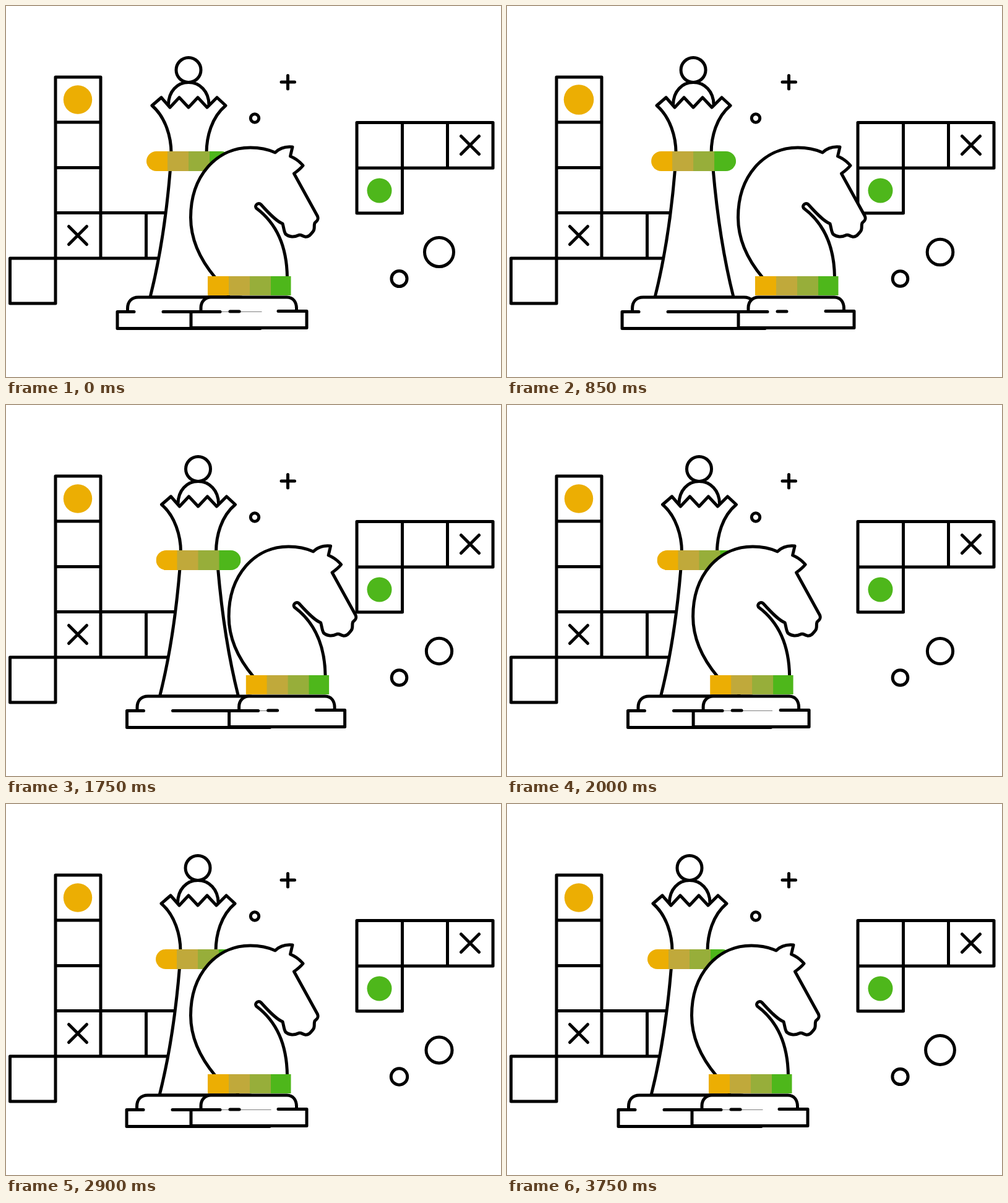
These frames come from a looping animation (800x600 px, 3.8 s). An HTML page:

```html
<!DOCTYPE html>
<html lang="en">
<head>
<meta charset="utf-8">
<title>Chess pieces</title>
<style>
html, body { margin: 0; width: 100%; height: 100%; overflow: hidden; background: #fff; }
svg { display: block; }
.line { fill: none; stroke: #000; stroke-width: 5; stroke-linecap: round; stroke-linejoin: round; }
.solid { fill: #fff; }
</style>
</head>
<body>
<svg width="800" height="600" viewBox="0 0 800 600">
  <defs>
    <g id="band">
      <path fill="#ecae03" d="M0 0h35v32H0z"/>
      <path fill="#c0a93b" d="M34 0h35v32H34z"/>
      <path fill="#97ae3a" d="M68 0h35v32H68z"/>
      <path fill="#4eb71b" d="M102 0h35v32h-35z"/>
    </g>
    <clipPath id="pill"><rect width="137" height="32" rx="16"/></clipPath>
    <clipPath id="strip"><rect width="134.5" height="31"/></clipPath>
    <path id="cross" d="M-14.5-14.5l29 29m0-29l-29 29"/>
  </defs>

  <g class="line">
    <path d="M80 115h73v293H80zM80 188h73M80 261.5h73M80 334.5h220v73.5H153M226.5 334.5V408M80 408H6.500v73H80z"/>
    <path d="M567 188.500h220V262H567zM640.500 188.500V335H567V262M713.500 188.500V262"/>
    <path d="M445 123h21.500M455.500 112.500V134"/>
    <circle cx="402" cy="181.500" r="6.700"/>
    <circle id="big" cx="700" cy="398"/>
    <circle id="small" cx="635.500" cy="441"/>
    <use id="leftCross" href="#cross"/>
    <use id="rightCross" href="#cross"/>
  </g>
  <circle id="orange" r="23.200" fill="#ecae03"/>
  <circle id="green" r="20" fill="#4eb71b"/>

  <g id="queen">
    <g class="line">
      <circle class="solid" cx="295" cy="103.500" r="20"/>
      <path class="solid" d="M262.500 160C262.500 138 277 123.500 295 123.500S328 138 328 160"/>
      <path class="solid" d="M267 238C267 212 258 180 236 161L251 148 265 164 280 148 295 164 310 148 325 164 341 148 355 161C332 180 324 212 324 238"/>
      <path class="solid" d="M265.500 264Q256 380 233 471H360Q337 380 327 264"/>
      <path class="solid" d="M207 494.500H180V521.500H411V494.500H254M196.500 492V489C196.500 478 203 471 214 471H377C388 471 394.500 478 394.500 489V492"/>
    </g>
    <g transform="translate(227 235)"><use href="#band" clip-path="url(#pill)"/></g>
  </g>

  <g id="knight">
    <path class="solid" d="M299 494.500h187v26H299zM315 494V488C315 478 322 471 331 471H454C465 471 469.500 480 469.500 489V494z"/>
    <g class="line">
      <path class="solid" d="M338 439C312 408 298.500 376 298.500 342C298.500 275 340 229 395 229C410 229 424 232 435 237C441 231 449 226.500 463 228L459.500 243C469 247 475 252 480 258C476 263 471 267 465.500 271L503.500 340C506 347 501 348 499 351C497 356 500 361 496 365C492 370 489 374 483 373C477 371 476 369 472 371C466 374 458 374 452 369C449 365 449 358 447 352C439 349 430 341 412 321C408 317 401 322 404.500 327C438 352 454 390 454.500 439"/>
      <path d="M315 492V488C315 478 322 471 331 471H454C465 471 469.500 480 469.500 489V492"/>
      <path d="M440 493.500H486V520.500H299V494.500H346M362 494H377"/>
    </g>
    <g transform="translate(326 437)"><use href="#band" clip-path="url(#strip)"/></g>
  </g>
</svg>
<script>
const LOOP = 3800, MOVE = 500;
const $ = id => document.getElementById(id);
const wave = (t, period, peak) => (1 + Math.cos(2 * Math.PI * (t - peak) / period)) / 2;

// Symmetric ease, cubic-bezier(.6, 0, .4, 1), solved by bisection
function ease(x) {
  if (x <= 0) return 0;
  if (x >= 1) return 1;
  let lo = 0, hi = 1;
  for (let i = 0; i < 20; i++) {
    const s = (lo + hi) / 2, r = 1 - s;
    if (1.8 * s * r * r + 1.2 * s * s * r + s ** 3 < x) lo = s; else hi = s;
  }
  return lo * lo * (3 - 2 * lo);
}

const thereAndBack = (t, out, back) => ease((t - out) / MOVE) - ease((t - back) / MOVE);

const pulse = (t, peaks) => Math.max(...peaks.map(p =>
  Math.abs(t - p) < 150 ? Math.cos((t - p) / 300 * Math.PI) ** 2 : 0));

const marks = [
  { id: 'green', x: 603.5, y: 298.5, grow: 0.12, peaks: [230, 2550] },
  { id: 'rightCross', x: 750, y: 225, grow: 0.36, peaks: [470, 2150] },
  { id: 'orange', x: 116, y: 151.5, grow: 0.1, peaks: [930, 3070] },
  { id: 'leftCross', x: 116, y: 371, grow: 0.36, peaks: [1500, 3560] },
];

function draw(t) {
  $('knight').setAttribute('transform', `translate(${75 * thereAndBack(t, 15, 1580)})`);
  $('queen').setAttribute('transform', `translate(${15.5 * thereAndBack(t, 623, 2819)})`);
  for (const { id, x, y, grow, peaks } of marks)
    $(id).setAttribute('transform', `translate(${x} ${y}) scale(${1 + grow * pulse(t, peaks)})`);
  $('big').setAttribute('r', 20.6 + 2.9 * wave(t, LOOP / 3, 0) ** 2);
  $('small').setAttribute('r', 12.3 + wave(t, LOOP, 3100) ** 4);
}

function tick() {
  draw(performance.now() % LOOP);
  requestAnimationFrame(tick);
}
tick();
</script>
</body>
</html>
```
